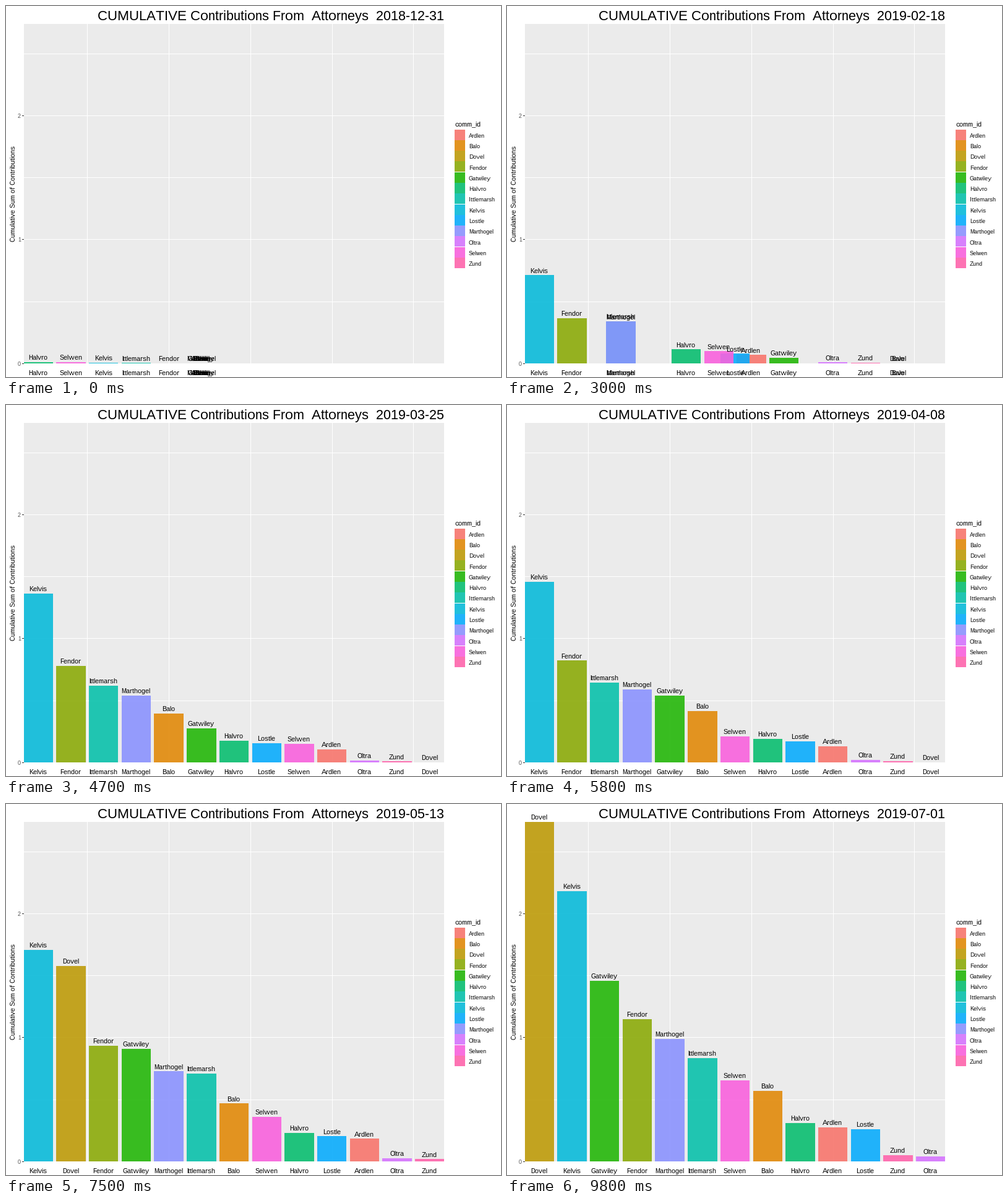
Write a matplotlib script that moves like this. It is 800 px wide and 600 px high and loops after 10000 ms.

```python
import numpy as np
import matplotlib.pyplot as plt
from matplotlib.animation import FuncAnimation
from matplotlib.patches import Rectangle

plt.rcParams.update({
    "font.family": "Liberation Sans",
    # whole-pixel glyph advances, no kerning
    "text.hinting": "native",
    "text.hinting_factor": 1,
    "text.kerning_factor": 6,
})

W, H, DPI = 800, 600, 100
FRAMES, INTERVAL = 100, 100
LAST = 26
LEFT, RIGHT, TOP, BASE = 29, 708, 29, 578
SLOT, UNIT = 52.7, 200.2
ALPHA = 0.9

# name, final sum, then (week, sum) turning points from launch on
SERIES = [
    ("Ardlen", .275, (5, 0), (7, .065)),
    ("Balo", .569, (10, 0), (12, .395)),
    ("Dovel", 2.742, (16, 0), (17, 1.144), (22, 2.233)),
    ("Fendor", 1.149, (3.5, .001), (12, .779)),
    ("Gatwiley", 1.459, (0, 0), (10, .06), (17, .809)),
    ("Halvro", .31, (0, .011), (12, .175)),
    ("Ittlemarsh", .834, (2, .003), (12, .619)),
    ("Kelvis", 2.183, (2.6, .004), (12, 1.363)),
    ("Lostle", .26, (5, 0), (7, .02), (8, .135)),
    ("Marthogel", .989, (4.7, 0), (7, .315), (12, .539)),
    ("Oltra", .04, (0, 0)),
    ("Selwen", .654, (0, .01), (12, .15)),
    ("Zund", .05, (0, 0), (17, .012)),
]
NAMES = [s[0] for s in SERIES]


def growth(final, *knots):
    """Weekly sums: straight between turning points, then speeding up."""
    weeks = np.arange(LAST + 1)
    xs, ys = zip(*knots)
    u = np.clip((weeks - xs[-1]) / (LAST - xs[-1]), 0, 1)
    return np.interp(weeks, xs, ys) + (final - ys[-1]) * u ** 1.25


def hue_color(i, chroma=100, light=65):
    """Evenly spaced hues of equal lightness, from polar CIELUV to sRGB."""
    h = np.radians(15 + 360 * i / len(SERIES))
    u = chroma * np.cos(h) / (13 * light) + 0.19784
    v = chroma * np.sin(h) / (13 * light) + 0.46834
    y = ((light + 16) / 116) ** 3
    x = 9 * y * u / (4 * v)
    z = 3 * y / v - 5 * y - x / 3
    rgb = np.array([3.2405 * x - 1.5372 * y - 0.4985 * z,
                    -0.9693 * x + 1.8760 * y + 0.0416 * z,
                    0.0556 * x - 0.2040 * y + 1.0573 * z])
    rgb = np.clip(rgb, 0.00304, 1)
    return tuple(np.clip(1.055 * rgb ** (1 / 2.4) - 0.055, 0, 1))


values = np.array([growth(*s[1:]) for s in SERIES])
ranks = 1 + (values[None, :, :] > values[:, None, :]).sum(axis=1)
colors = [hue_color(i) for i in range(len(SERIES))]


def arrival(week):
    """Frame in which a week's ranking is reached."""
    return 4 * week - 1 if week <= 21 else 83 + 3 * (week - 21)


def slot_x(rank):
    return 28.7 + (rank - 0.55) * SLOT


def value_y(value):
    return BASE - value * UNIT


fig = plt.figure(figsize=(W / DPI, H / DPI), dpi=DPI, facecolor="white")
ax = fig.add_axes([0, 0, 1, 1])
ax.set_xlim(0, W)
ax.set_ylim(H, 0)
ax.axis("off")


def rect(x, y, w, h, color, **kw):
    return ax.add_patch(Rectangle((x, y), w, h, facecolor=color, linewidth=0,
                                  antialiased=False, **kw))


def text(x, y, label, px, color="black", **kw):
    kw.setdefault("va", "baseline")
    return ax.text(x, y, label, fontsize=px * 72 / DPI + 0.01, color=color,
                   **kw)


def draw_panel():
    rect(LEFT, TOP, RIGHT - LEFT, BASE - TOP, "#EBEBEB")
    for v in np.arange(0.5, 2.6, 0.5):
        rect(LEFT, int(value_y(v) + 0.15), RIGHT - LEFT, 1, "white")
    for r in np.arange(2.5, 13, 2.5):
        rect(int(slot_x(r) + 0.5), TOP, 1, BASE - TOP, "white")
    for v in range(3):
        y = int(value_y(v))
        rect(26, y, 3, 1, "#333333")
        text(24, y + 4, str(v), 9, "#4D4D4D", ha="right")
    text(15.5, 303.5, "Cumulative Sum of Contributions", 11, ha="center",
         rotation=90, rotation_mode="anchor")


def draw_legend():
    text(725, 194, "comm_id", 11)
    for i, (name, color) in enumerate(zip(NAMES, colors)):
        y = 200.1 + 17.28 * i
        rect(725, int(y), 17, 17, "#F2F2F2")
        rect(725, int(y), 17, 17, color, alpha=ALPHA)
        text(748, round(y + 12.7), name, 9)


draw_panel()
draw_legend()
title = text(RIGHT, 23, "", 22, ha="right")
bars = [rect(0, BASE, 1, 0, c, alpha=ALPHA) for c in colors]
tops = [text(0, 0, n, 11, ha="center") for n in NAMES]
feet = [text(0, 597, n, 11, ha="center") for n in NAMES]


def update(frame):
    week = max(k for k in range(LAST + 1) if arrival(k) <= frame)
    nxt = min(week + 1, LAST)
    mix = 0.5 if arrival(nxt) == frame + 1 else 0
    now = values[:, week] * (1 - mix) + values[:, nxt] * mix
    place = ranks[:, week] * (1 - mix) + ranks[:, nxt] * mix
    for bar, top, foot, v, r in zip(bars, tops, feet, now, place):
        x, y = slot_x(r), value_y(v)
        x0, x1 = (int(x + side * 0.45 * SLOT + 0.45) for side in (-1, 1))
        bar.set_bounds(x0, round(y), x1 - x0, BASE - round(y))
        bar.set_visible(round(y) < BASE)
        top.set_position((x - 0.5, y - 3.7))
        foot.set_position((x - 0.5, 597))
    date = np.datetime64("2018-12-31") + 7 * week
    title.set_text(f"CUMULATIVE Contributions From  Attorneys  {date}")
    return [title, *bars, *tops, *feet]


anim = FuncAnimation(fig, update, frames=FRAMES, interval=INTERVAL,
                     init_func=lambda: update(0), repeat=True, repeat_delay=0,
                     blit=False)
plt.show()
```
